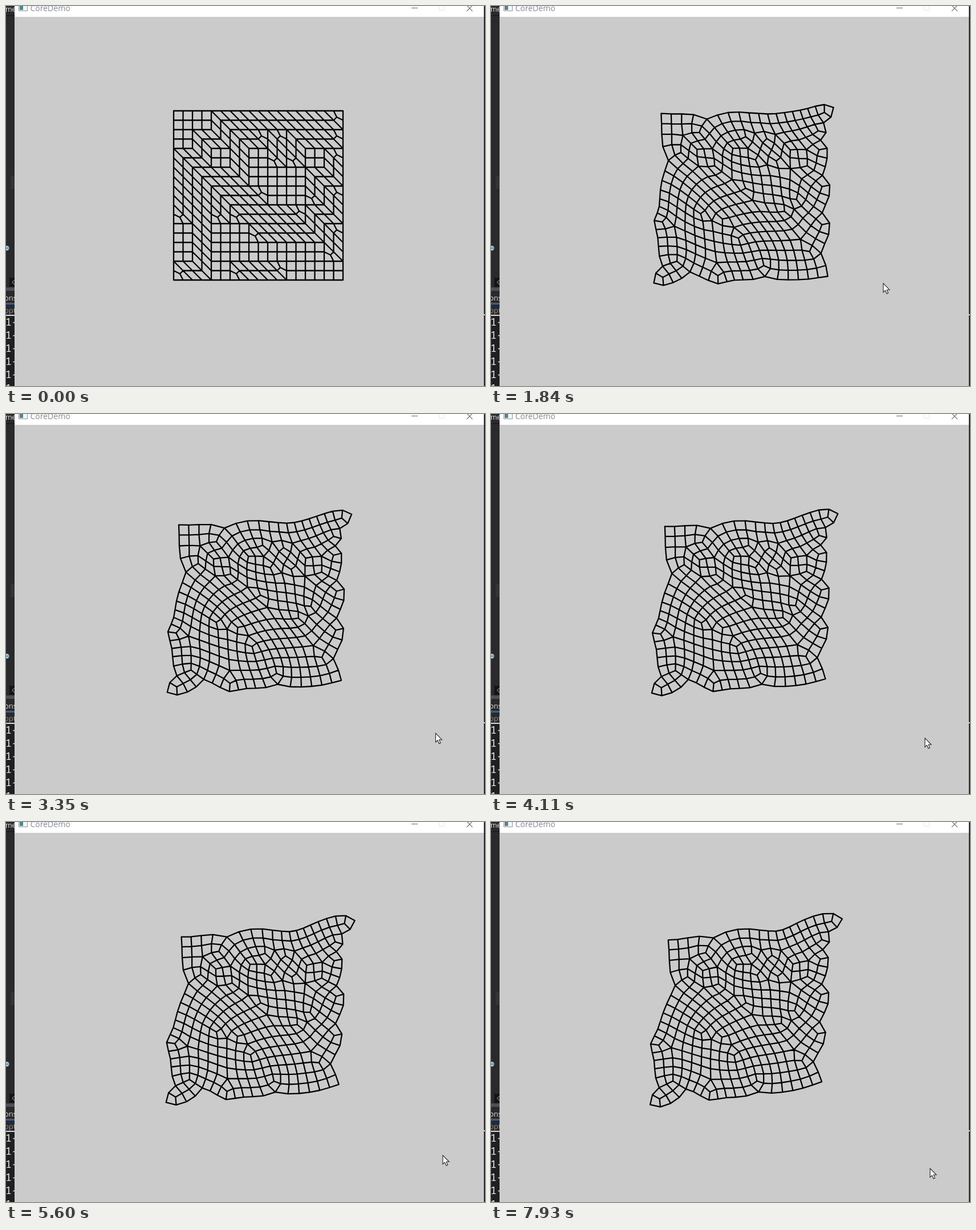
Recreate the animation shown at these times as an HTML page. Size 840 by 667 pixels, loop 8 s.

```html
<!DOCTYPE html>
<html lang="en">
<head>
<meta charset="utf-8">
<title>Grid relaxation</title>
<style>
  html, body { margin: 0; width: 100%; height: 100%; overflow: hidden; background: #cbcbcb; }
  svg { display: block; width: 840px; height: 667px; }
  .ui { font-family: "Open Sans", "Noto Sans", sans-serif; }
  .log { font-family: "Noto Sans Mono", "DejaVu Sans Mono", monospace; font-size: 18px; fill: #f0f0f0; }
</style>
</head>
<body>
<svg viewBox="0 0 840 667">
  <!-- editor behind the window -->
  <rect width="840" height="667" fill="#2a2a2c"/>
  <rect y="16" width="15" height="2" fill="#1d1d1f"/>
  <text class="ui" x="-8" y="10" font-size="12.5" fill="#e6e6e6">ame</text>
  <rect x="8" y="298" width="7" height="23" fill="#343437"/>
  <circle cx="1.5" cy="425" r="4.2" fill="#a9c3d6"/>
  <path d="M-2 425H5" stroke="#50718a" stroke-width="1.4"/>
  <rect x="6" y="477" width="9" height="16" fill="#151517"/>
  <path d="M15 481L11 485L15 489" fill="none" stroke="#777" stroke-width="1.3"/>
  <rect y="494" width="15" height="6" fill="#505054"/>
  <text class="ui" x="-3" y="517" font-size="13" fill="#dcdcdc">ons</text>
  <rect y="521" width="15" height="3" fill="#35639a"/>
  <text class="ui" x="-3" y="539" font-size="13" fill="#8c8c8c">opt</text>
  <rect y="544" width="15" height="123" fill="#202022"/>
  <path d="M0 543H15M837 542H840" stroke="#d8d8d8" stroke-width="2"/>
  <g id="log" class="log"></g>

  <!-- window -->
  <rect x="15" width="823" height="667" fill="#cbcbcb"/>
  <rect x="15" width="823" height="19" fill="#fff"/>
  <rect x="22.5" y="-4.5" width="15" height="13" fill="#f3f6f6" stroke="#8b9595"/>
  <rect x="24" y="-3" width="6" height="10" fill="#587f91"/>
  <text class="ui" x="42.5" y="8.5" font-size="14" fill="#858b90">CoreDemo</text>
  <path d="M711 3.5H722" stroke="#777" stroke-width="1.2"/>
  <rect x="759.5" y="-2.5" width="9" height="10" fill="none" stroke="#e6e6e6"/>
  <path d="M808 -1L818 9M818 -1L808 9" stroke="#777" stroke-width="1.2"/>

  <path id="mesh" fill="none" stroke="#000" stroke-width="2.3" stroke-linejoin="round" stroke-linecap="round"/>
  <path id="cursor" d="M0 0V15.5L3.5 12.3L6 18L8.6 16.9L6.2 11.3H11Z" fill="#fff" stroke="#222" stroke-width="1.1"/>
</svg>
<script>
const LOOP = 8000, START = 110, LAST = 7930;
const CELL = 33, LEFT = 294, TOP = 184;
const STIFF = 0.1, MAX_STEPS = 1200;
// Lengths of the two diagonals of the mesh at the end of the loop.
const FALL_END = 366.6, RISE_END = 468.8;

// Upper half of each cell: S joins the lower half, H the right cell, V the cell above, T stays alone.
const ROWS = [
  'SSHHHHHHT', 'SHVHTTHHT', 'HVSVSVVST',
  'VHHVSSSHV', 'VVHHTSSVT', 'VVVHHHTHV',
  'SVSSHHHVT', 'SVSSSSSSV', 'HVSHHTSSS'
];
const OUTLINE = {
  S: [[0, 0], [1, 0], [1, 1], [0, 1]],
  H: [[0, 0], [1, 0], [2, 1], [1, 1]],
  V: [[0, -1], [1, 0], [1, 1], [0, 0]],
  T: [[0, 0], [1, 0], [1, 1]],
  low: [[0, 0], [1, 1], [0, 1]]
};

// Vertices are named by the offset of their x in the flat coordinate array.
const ids = new Map(), start = [], quads = [], edges = [];
const seen = new Set();

function vertex([x, y]) {
  const key = Math.round(x * 6) + ',' + Math.round(y * 6);
  if (!ids.has(key)) {
    ids.set(key, start.length);
    start.push(LEFT + x * CELL, TOP + y * CELL);
  }
  return ids.get(key);
}

function mean(points) {
  return [0, 1].map(k => points.reduce((sum, p) => sum + p[k], 0) / points.length);
}

function addEdge(a, b) {
  const key = Math.min(a, b) + '-' + Math.max(a, b);
  if (!seen.has(key)) {
    seen.add(key);
    edges.push([a, b]);
  }
}

// Split a face into one quad per corner.
function addFace(kind, r, c) {
  const pts = OUTLINE[kind].map(([x, y]) => [c + x, r + y]);
  const n = pts.length, mid = mean(pts);
  pts.forEach((p, i) => {
    const quad = [p, mean([p, pts[(i + 1) % n]]), mid, mean([p, pts[(i + n - 1) % n]])].map(vertex);
    quads.push(quad);
    quad.forEach((v, j) => addEdge(v, quad[(j + 1) % 4]));
  });
}

ROWS.forEach((row, r) => [...row].forEach((kind, c) => {
  addFace(kind, r, c);
  const taken = kind === 'S' || row[c - 1] === 'H' || (ROWS[r + 1] || '')[c] === 'V';
  if (!taken) addFace('low', r, c);
}));

// Pull the corners of every quad towards the best turned square of a fixed size.
function relax(p, side) {
  const next = Float32Array.from(p);
  for (const quad of quads) {
    const [a, b, c, d] = quad;
    const cx = (p[a] + p[b] + p[c] + p[d]) / 4;
    const cy = (p[a + 1] + p[b + 1] + p[c + 1] + p[d + 1]) / 4;
    let fx = p[a] + p[b + 1] - p[c] - p[d + 1];
    let fy = p[a + 1] - p[b] - p[c + 1] + p[d];
    const scale = side * Math.SQRT1_2 / Math.hypot(fx, fy);
    fx *= scale;
    fy *= scale;
    for (const v of quad) {
      next[v] += STIFF * (cx + fx - p[v]);
      next[v + 1] += STIFF * (cy + fy - p[v + 1]);
      [fx, fy] = [-fy, fx];
    }
  }
  return next;
}

const [nw, ne, se, sw] = [[0, 0], [9, 0], [9, 9], [0, 9]].map(vertex);
const span = (p, a, b) => Math.hypot(p[a] - p[b], p[a + 1] - p[b + 1]);

// Relax until the falling diagonal has shrunk to its final length.
function simulate(side) {
  const list = [Float32Array.from(start)];
  let p = list[0];
  while (span(p, nw, se) > FALL_END && list.length <= MAX_STEPS) {
    p = relax(p, side);
    list.push(p);
  }
  return list;
}

// Find the square size for which the rising diagonal ends at its length too.
function solve(low, high) {
  let list;
  for (let i = 0; i < 8; i++) {
    const side = (low + high) / 2;
    list = simulate(side);
    if (span(list[list.length - 1], sw, ne) > RISE_END) high = side;
    else low = side;
  }
  return list;
}

const states = solve(15, 19);

// time, x, y
const TRAIL = [
  [330, 760, 667], [500, 712, 565], [700, 685, 500], [970, 631, 423], [1090, 630.5, 422.5],
  [2600, 746, 552], [4110, 761, 569], [5600, 766, 585], [6730, 767, 589], [7930, 770, 608]
];

function trailAt(t) {
  const i = TRAIL.findIndex(k => k[0] > t);
  if (i < 0) return TRAIL[TRAIL.length - 1].slice(1);
  const [t0, x0, y0] = TRAIL[i - 1], [t1, x1, y1] = TRAIL[i];
  const f = (t - t0) / (t1 - t0);
  return [x0 + (x1 - x0) * f, y0 + (y1 - y0) * f];
}

const mesh = document.getElementById('mesh');
const cursor = document.getElementById('cursor');
document.getElementById('log').innerHTML =
  [0, 1, 2, 3, 4, 5].map(i => `<text x="-1" y="${561 + i * 23.1}">1-</text>`).join('');

function draw(t) {
  const progress = t < 150 ? 0 : Math.min(1, (t - START) / (LAST - START));
  const p = states[Math.round(progress * (states.length - 1))];
  const at = v => p[v].toFixed(1) + ' ' + p[v + 1].toFixed(1);
  mesh.setAttribute('d', edges.map(([a, b]) => 'M' + at(a) + 'L' + at(b)).join(''));

  const shown = t >= TRAIL[0][0];
  cursor.setAttribute('visibility', shown ? 'visible' : 'hidden');
  if (shown) cursor.setAttribute('transform', `translate(${trailAt(t)})`);
}

const begin = performance.now();
function tick() {
  draw((performance.now() - begin) % LOOP);
  requestAnimationFrame(tick);
}
tick();
</script>
</body>
</html>
```
